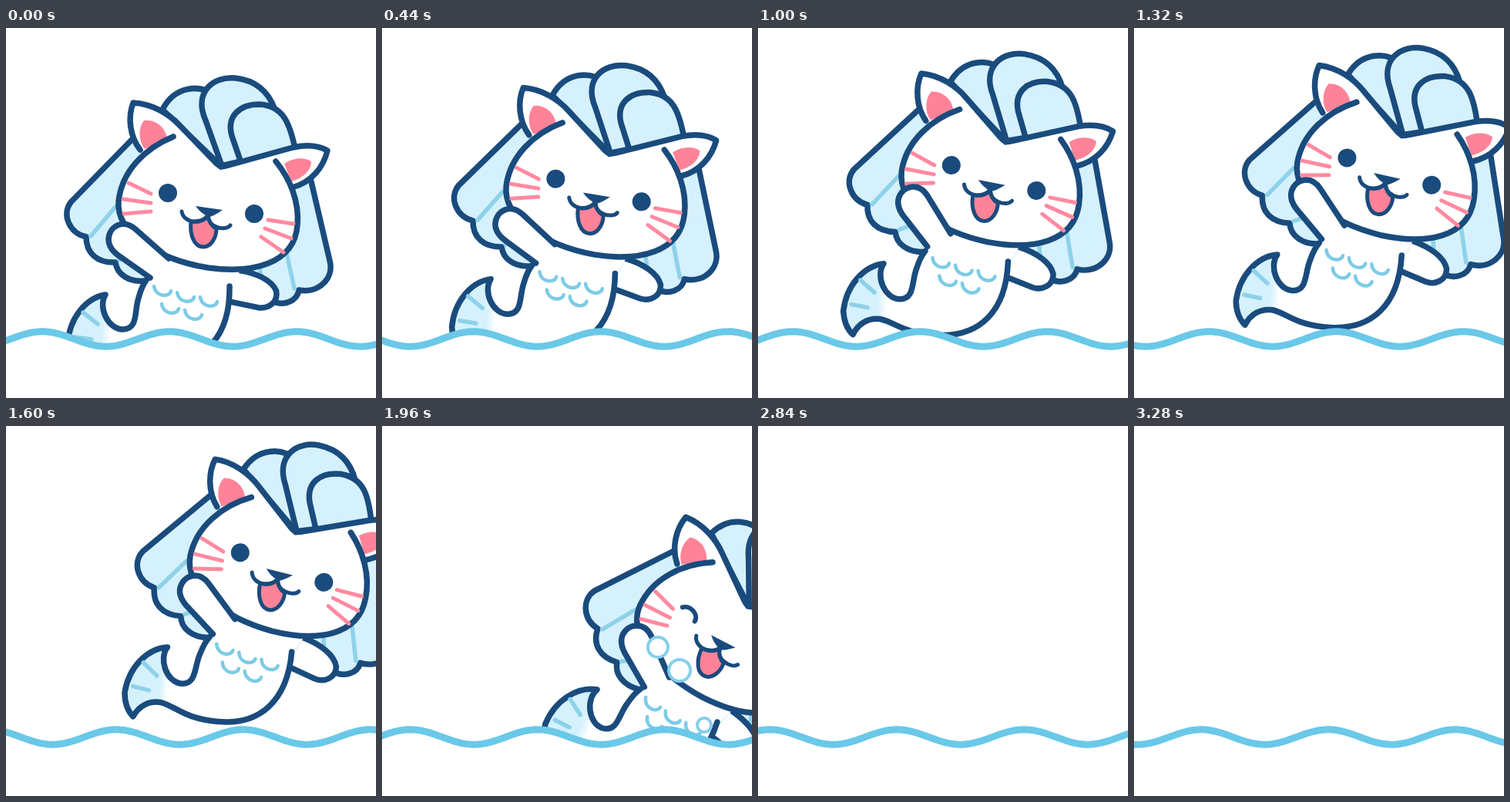
These frames come from a looping animation (480x480 px, 3360 ms). An HTML page:

```html
<!DOCTYPE html>
<html lang="en">
<head>
<meta charset="utf-8">
<title>Cat mermaid</title>
<style>
  html, body { margin: 0; width: 100%; height: 100%; overflow: hidden; background: #fff; }
  svg { display: block; width: 100vw; height: 100vh; }
  .ink { stroke: #1a4b7d; stroke-width: 7.5; }
  .thin { stroke: #1a4b7d; stroke-width: 5; }
  .solid { fill: #1a4b7d; }
  .white { fill: #fff; }
  .shell { fill: #d5f1fd; }
  .pink { fill: #ff8398; }
  .whisker { stroke: #ff8aa0; stroke-width: 5; }
  .ray { stroke: #8ed2e9; stroke-width: 5.5; }
  .scale { stroke: #7dcbe6; stroke-width: 4.5; }
  .bubble { stroke: #86cfea; }
  .wave { stroke: #6ac8e8; stroke-width: 9; }
</style>
</head>
<body>
<svg viewBox="0 0 480 480" fill="none" stroke-linecap="round" stroke-linejoin="round">
  <defs>
    <linearGradient id="fluke" gradientUnits="userSpaceOnUse" x1="124" y1="0" x2="136" y2="0">
      <stop stop-color="#d5f1fd"/><stop offset="1" stop-color="#fff"/>
    </linearGradient>
    <path id="lid" d="M-11 -4C-3 -10 12 -3 10 8"/>
  </defs>
  <g id="cat">
    <!-- shell -->
    <g class="ink shell">
      <path d="M165 143L84 226C72 242 82 266 104 271C104 292 118 305 142 304C144 320 160 330 180 328L345 354C360 362 378 354 380 340C406 345 426 324 420 302L395 195L278 181L207 102Z"/>
      <path d="M203 106C218 76 250 72 270 87L279 179Z"/>
      <path d="M279 176L259 120C243 84 268 62 298 65C325 68 341 84 349 106L352 162L279 179"/>
      <path d="M304 172L293 140C286 115 302 99 329 99C360 101 368 124 375 156"/>
    </g>
    <path class="ray" d="M142 232L110 270M364 292L374 338M328 305L331 324M158 296L147 301"/>
    <!-- body and tail -->
    <path id="armR" class="ink white" d="M303 315C325 320 345 330 350 345C352 360 338 368 325 365L286 354"/>
    <path class="white" d="M182 327L205 295H300L303 316L290 340L182 345Z"/>
    <path class="ink" fill="url(#fluke)" d="M290 335C291 400 258 434 205 435C160 436 148 421 128 418C112 417 100 426 94 440Q82 430 80 410C82 376 104 350 129 346C119 362 132 391 152 391C172 390 166 368 172 350Q176 335 182 327"/>
    <path class="ray" d="M100 369L119 384M90 401L111 404"/>
    <path class="scale" d="M192 335c2 14 20 15 22 6M222 343c2 14 20 15 22 6M252 349c2 14 20 15 22 6M202 358c2 14 20 15 22 6M232 366c2 14 20 15 22 6"/>
    <!-- head -->
    <path class="ink white" d="M174 158C160 140 158 115 165 97C190 98 212 112 225 126L278 181L372 155C390 151 405 152 417 159C412 180 397 200 371 207"/>
    <path class="white" d="M217 141C180 156 150 186 146 225C143 265 195 300 262 311C320 319 374 306 378 256C381 225 368 195 350 173L278 184Z"/>
    <path class="pink" d="M179 120C195 118 207 130 209 143L180 157C172 147 171 130 179 120ZM361 176C372 168 388 167 396 173C396 185 385 195 370 199Z"/>
    <path class="ink" d="M217 141C180 156 150 186 146 225C143 265 195 300 262 311C320 319 374 306 378 256C381 225 368 195 350 173"/>
    <path class="whisker" d="M159 201L188 215M152 222L188 227M153 241L188 238M340 249L373 254M336 260L370 273M331 271L360 291"/>
    <path class="thin pink" d="M240 251C238 268 244 284 256 284C266 284 273 272 273 260Q264 256 262 243Q256 252 240 251"/>
    <path class="thin" d="M228 238C230 254 257 256 262 242C261 259 285 264 291 256"/>
    <path class="solid" d="M246 231L281 236Q268 245 263 245Q252 240 246 231"/>
    <g id="open" class="solid"><circle cx="210" cy="214" r="12"/><circle cx="322" cy="241" r="12"/></g>
    <g id="shut" class="thin" style="stroke-width:6">
      <use href="#lid" x="210" y="213"/><use href="#lid" x="322" y="240"/>
    </g>
    <path id="armL" class="ink white" d="M211 299L168 261C152 247 134 257 133 274C133 286 142 293 150 298L187 324"/>
  </g>
  <g id="bubbles" class="bubble white"><circle/><circle/><circle/></g>
  <path id="wave" class="wave white"/>
</svg>
<script>
const LOOP = 3360, STEP = 40, WAVELENGTH = 165;
const el = id => document.getElementById(id);
const circles = [...el('bubbles').children];

// time, x, y, tilt, left arm, right arm
const poses = [
  [0, 266, 228, 0, 0, -4],
  [440, 281, 211, 1.4, 0, 3],
  [1000, 306, 195, 3, 14, 3],
  [1600, 358, 184, 6, 6, 3],
  [1720, 378, 202, 9, 6, 3],
  [1960, 447, 275, 19, 6, 3],
  [2320, 590, 540, 45, 6, 3]
];

// x, y, radius early in the splash and again near its end
const splash = [
  [358, 287, 13, 253, 178, 4.5],
  [386, 317, 14, 459, 118, 11],
  [418, 388, 9, 431, 179, 5.5]
];

const mix = (a, b, k) => a + (b - a) * k;
const clamp = v => Math.max(0, Math.min(1, v));

function slope(i, c) {
  const a = poses[Math.max(0, i - 1)], b = poses[Math.min(poses.length - 1, i + 1)];
  return (b[c] - a[c]) / (b[0] - a[0]);
}

// smooth curve through the poses
function poseAt(t) {
  let i = 0;
  while (i < poses.length - 2 && t >= poses[i + 1][0]) i++;
  const a = poses[i], b = poses[i + 1], d = b[0] - a[0], u = (t - a[0]) / d;
  const s = u * u * (3 - 2 * u);
  return [1, 2, 3, 4, 5].map(c => mix(a[c], b[c], s)
    + d * u * (1 - u) * ((1 - u) * slope(i, c) - u * slope(i + 1, c)));
}

function drawCat(t) {
  const visible = t < 2320;
  el('cat').style.display = visible ? '' : 'none';
  if (!visible) return;
  const [x, y, tilt, left, right] = poseAt(t);
  el('cat').setAttribute('transform', `translate(${x} ${y}) rotate(${tilt}) translate(-266 -228)`);
  el('armL').setAttribute('transform', `rotate(${left} 198 312)`);
  el('armR').setAttribute('transform', `rotate(${right} 293 335)`);
  const closed = t >= 1780;
  el('open').style.display = closed ? 'none' : '';
  el('shut').style.display = closed ? '' : 'none';
}

function drawBubbles(t) {
  const rise = 1 - (1 - clamp((t - 1860) / 700)) ** 2;
  const k = (rise - .265) / .722;
  const size = clamp((t - 1860) / 100) * clamp((2840 - t) / 360);
  circles.forEach((c, i) => {
    const [x0, y0, r0, x1, y1, r1] = splash[i];
    const r = mix(r0, r1, clamp((t - 1960) / 520)) * size;
    c.setAttribute('cx', mix(x0, x1, k));
    c.setAttribute('cy', mix(y0, y1, k));
    c.setAttribute('r', r);
    c.setAttribute('stroke-width', r ? Math.min(4, 1.2 + r * .3) : 0);
  });
}

function drawWave(t) {
  const crest = 47 + t * .1631;
  let d = 'M-20 500';
  for (let x = -20; x <= 500; x += 5) {
    d += `L${x} ${(403.5 - 9.7 * Math.cos((x - crest) / WAVELENGTH * 2 * Math.PI)).toFixed(2)}`;
  }
  el('wave').setAttribute('d', d + 'L500 500Z');
}

const start = performance.now();
function frame() {
  const now = Math.max(0, performance.now() - start) % LOOP;
  const t = Math.min(3280, Math.floor(now / STEP) * STEP);
  drawCat(t);
  drawBubbles(t);
  drawWave(t);
  requestAnimationFrame(frame);
}
frame();
</script>
</body>
</html>
```
